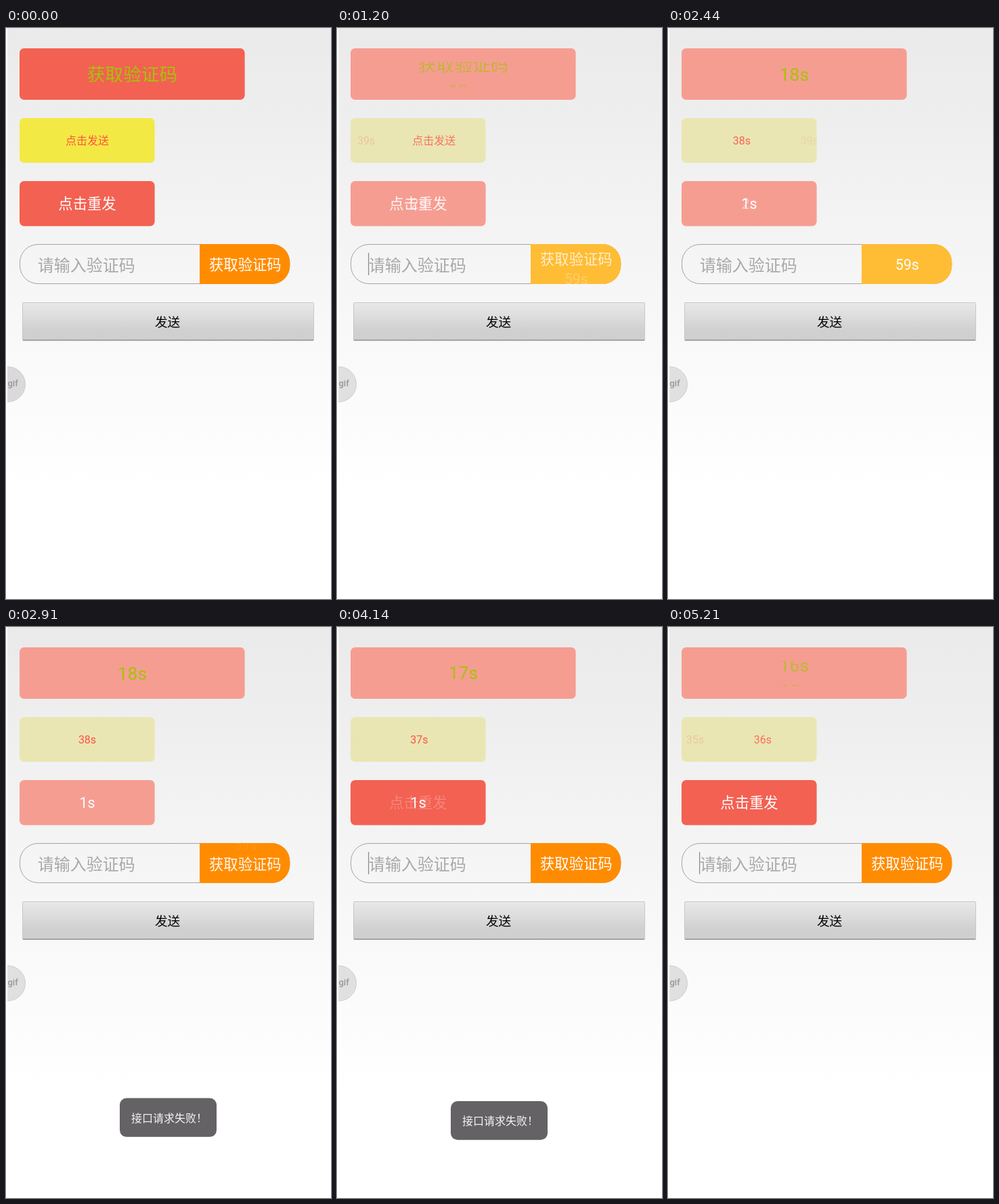
An HTML page with a canvas that plays this animation: 480x843 px, repeating every 5310 ms.

```html
<!DOCTYPE html>
<html lang="zh-CN">
<head>
<meta charset="utf-8">
<style>
html, body { margin: 0; width: 100%; height: 100%; overflow: hidden; background: #fff; }
canvas { display: block; width: 480px; height: 843px; }
</style>
</head>
<body>
<canvas id="stage"></canvas>
<script>
const W = 480, H = 843, LOOP = 5310;
const FONT = 'Roboto, "Noto Sans CJK SC", "Noto Sans CJK", sans-serif';
const canvas = document.getElementById('stage');
const dpr = window.devicePixelRatio || 1;
canvas.width = Math.round(W * dpr);
canvas.height = Math.round(H * dpr);
const c = canvas.getContext('2d');

const clamp = x => Math.max(0, Math.min(1, x));
const ease = x => 0.5 - Math.cos(Math.PI * clamp(x)) / 2;

// Transitions: each returns the offset and opacity of the leaving and entering label.
const slideUp = height => x => {
  const p = ease(x);
  return { out: [0, -height * p, 1 - p], in: [0, height * (1 - p), p] };
};
const slideRight = width => x => {
  const p = ease(x);
  return { out: [width * p, 0, 1 - p], in: [-width * (1 - p), 0, p] };
};
const fade = x => ({ out: [0, 0, 1 - x * x], in: [0, 0, 1 - (1 - x) ** 2] });

const TICKS = [1073, 2128, 3120, 4110, 5093];
const countdown = (label, from) =>
  [[-1e4, label], ...TICKS.map((at, i) => [at, from - i + 's'])];

const RED = '#f36152', PALE_RED = '#f69d92';
const BUTTONS = [
  { x: 20, y: 30, w: 332.6, h: 76, radii: 6.7, on: RED, off: PALE_RED, ink: '#a5c20a',
    size: 26.67, cx: 186.5, base: 78.4, clip: [50, 88], dur: 300, move: slideUp(38),
    steps: countdown('获取验证码', 19), busy: [880, LOOP] },
  { x: 20, y: 133, w: 199.6, h: 66, radii: 6.7, on: '#f3e945', off: '#e9e6b3', ink: '#ff5044',
    size: 16, cx: 120, base: 172.4, clip: [133, 199], dur: 400, move: slideRight(100),
    steps: countdown('点击发送', 39), busy: [880, LOOP] },
  { x: 20, y: 226, w: 199.6, h: 66.5, radii: 6.7, on: RED, off: PALE_RED, ink: '#fff',
    size: 21.33, cx: 120, base: 267, clip: [226, 292], dur: 400, move: fade,
    steps: [[-1e4, '点击重发'], [1073, '2s'], [2128, '1s'], [4090, '点击重发']], busy: [880, 4090] },
  { x: 286, y: 319, w: 133.3, h: 59, radii: [0, 26.7, 26.7, 0], on: '#ff8c00', off: '#ffbd35', ink: '#fff',
    size: 21.33, cx: 353.3, base: 356.6, clip: [319, 378], dur: 300, move: slideUp(29),
    steps: [[-1e4, '获取验证码'], [1100, '59s'], [2660, '获取验证码']], busy: [880, 2660] }
];

const CURSOR = [[680, 1390], [1900, 2430], [3020, 3450], [3920, 4430], [4940, LOOP]];
const TOAST = { start: 2690, leave: 4490, end: 4790 };

function box(x, y, w, h, radii, fill) {
  c.beginPath();
  c.roundRect(x, y, w, h, radii);
  c.fillStyle = fill;
  c.fill();
}

function write(text, x, y, size, color, align = 'center', weight = 400) {
  c.font = `${weight} ${size}px ${FONT}`;
  c.textAlign = align;
  c.fillStyle = color;
  c.fillText(text, x, y);
}

function gradient(y0, y1, ...stops) {
  const g = c.createLinearGradient(0, y0, 0, y1);
  stops.forEach(([at, color]) => g.addColorStop(at, color));
  return g;
}

function drawBackdrop() {
  c.fillStyle = '#fff';
  c.fillRect(0, 0, W, H);
  c.fillStyle = gradient(0, 680, [0, '#eaeaea'], [0.45, '#f4f4f4'], [1, '#fff']);
  c.fillRect(2, 0, W - 2, 680);
}

function drawButton(b, t) {
  const busy = t >= b.busy[0] && t < b.busy[1];
  box(b.x, b.y, b.w, b.h, b.radii, busy ? b.off : b.on);

  let i = b.steps.length - 1;
  while (b.steps[i][0] > t) i--;
  const x = clamp((t - b.steps[i][0]) / b.dur);
  const pose = b.move(x);
  const put = (text, [dx, dy, alpha]) => {
    c.globalAlpha = alpha;
    write(text, b.cx + dx, b.base + dy, b.size, b.ink);
  };

  c.save();
  c.beginPath();
  c.rect(b.x, b.clip[0], b.w, b.clip[1] - b.clip[0]);
  c.clip();
  if (x < 1 && i > 0) put(b.steps[i - 1][1], pose.out);
  put(b.steps[i][1], pose.in);
  c.restore();
}

function drawInput(t) {
  c.beginPath();
  c.roundRect(20.5, 319.5, 398.3, 58, 26.7);
  c.strokeStyle = '#a3a3a3';
  c.lineWidth = 1;
  c.stroke();
  write('请输入验证码', 46.7, 358.5, 24, '#a8a8a8', 'left');
  if (CURSOR.some(([a, b]) => t >= a && t < b)) {
    c.fillStyle = '#8e8e8e';
    c.fillRect(46, 332, 1.3, 33);
  }
}

function drawSend(t) {
  const pressed = t >= 820 && t < 880;
  box(24, 405, 431, 57, 2, '#c6c8c6');
  c.fillStyle = pressed
    ? gradient(406, 460, [0, '#d4d4d4'], [1, '#bfbfbf'])
    : gradient(406, 460, [0, '#e8e8e8'], [0.4, '#dcdcdc'], [0.75, '#d0d0d0'], [1, '#cecfce']);
  c.fillRect(25, 406, 429, 54);
  c.fillStyle = '#979d97';
  c.fillRect(25, 460, 429, pressed ? 3 : 1.5);
  write('发送', 238.6, 440.8, 18.67, '#000');
}

function drawBubble(t) {
  c.save();
  c.beginPath();
  c.rect(2, 490, 40, 72);
  c.clip();
  c.beginPath();
  c.arc(2.5, 526, 26, 0, Math.PI * 2);
  c.fillStyle = t < 100 ? '#dbd9db' : '#e0e0e0';
  c.fill();
  c.strokeStyle = '#cecece';
  c.lineWidth = 1;
  c.stroke();
  write('gif', 2.5, 529, 13, '#979797', 'left', 500);
  c.restore();
}

function drawToast(t) {
  if (t < TOAST.start || t > TOAST.end) return;
  const s = (t - TOAST.start) / 1000;
  const dy = 33 * Math.exp(-7.5 * s) * Math.cos(10.7 * s);
  const leaving = clamp((TOAST.end - t) / (TOAST.end - TOAST.leave));
  c.save();
  c.globalAlpha = Math.min(clamp(s / 0.18), leaving);
  c.translate(0, dy);
  box(168, 700, 143, 57.3, 10, '#646264');
  write('接口请求失败！', 185, 735, 16, '#f4f4f4', 'left');
  c.restore();
}

function draw(t) {
  c.setTransform(dpr, 0, 0, dpr, 0, 0);
  drawBackdrop();
  drawInput(t);
  BUTTONS.forEach(b => drawButton(b, t));
  drawSend(t);
  drawBubble(t);
  drawToast(t);
}

const begin = performance.now();
function frame() {
  draw((performance.now() - begin) % LOOP);
  requestAnimationFrame(frame);
}
frame();
</script>
</body>
</html>
```
